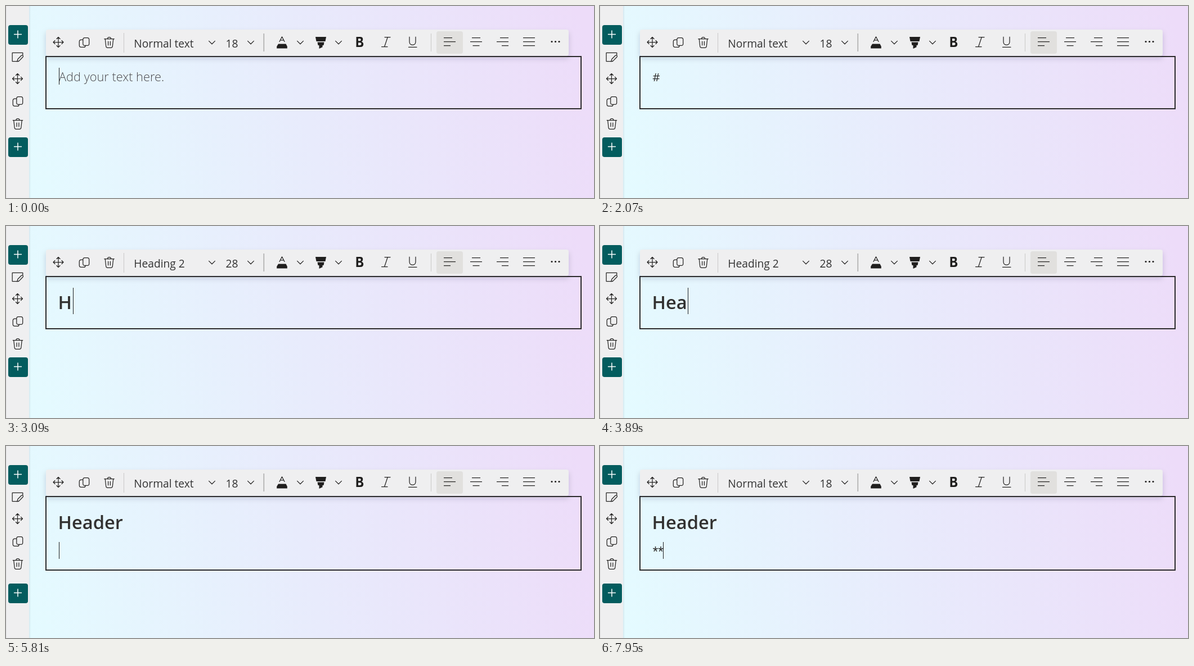
These frames come from a looping animation (1045x342 px, 8000 ms). An HTML page:

```html
<!DOCTYPE html>
<html lang="en">
<head>
<meta charset="utf-8">
<title>Text editor</title>
<style>
  html, body { margin: 0; width: 100%; height: 100%; overflow: hidden; }
  svg { display: block; width: 100vw; height: 100vh; }
  text { font-family: "Open Sans", "Noto Sans", sans-serif; fill: #323130; white-space: pre; }
  .label { font-size: 19.2px; fill: #333; }
  .hint { font-size: 21.8px; font-weight: 300; fill: #4c4b4e; }
  .body { font-size: 20.8px; }
  .head { font-size: 32.6px; font-weight: 600; }
  .head.hint { fill: #605e5c; }
  .stars { font-family: Roboto, "Open Sans", sans-serif; font-size: 22px; }
  .icon { fill: none; stroke: #252423; stroke-width: 1.25; stroke-linecap: round; stroke-linejoin: round; }
  .solid { fill: #201f1e; }
</style>
</head>
<body>
<svg viewBox="0 0 1045 342" preserveAspectRatio="none">
  <defs>
    <linearGradient id="sky" gradientUnits="userSpaceOnUse" x1="41" y1="342" x2="1045" y2="120">
      <stop offset="0" stop-color="#e4fbff"/>
      <stop offset=".5" stop-color="#e8ebfc"/>
      <stop offset="1" stop-color="#eddcf9"/>
    </linearGradient>
    <filter id="shade" x="-5%" y="-40%" width="110%" height="220%">
      <feDropShadow dx="0" dy="5" stdDeviation="5" flood-color="#1c2440" flood-opacity=".17"/>
    </filter>
    <filter id="edge" x="-20%" y="-5%" width="150%" height="110%">
      <feDropShadow dx="1" dy="0" stdDeviation="1.5" flood-color="#1c2440" flood-opacity=".1"/>
    </filter>
    <path id="move" d="M0-9V9M-9 0H9M-3-6 0-9 3-6M-3 6 0 9 3 6M-6-3-9 0-6 3M6-3 9 0 6 3"/>
    <path id="copy" d="M1-8.5H5.5Q8.7-8.5 8.7-5.3V2.2Q8.7 5.4 5.5 5.4H1Q-2.2 5.4-2.2 2.2V-5.3Q-2.2-8.5 1-8.5ZM-2.2-4.8H-5Q-8.7-4.8-8.7-1.4V5Q-8.7 8.4-5.3 8.4H-.8Q2.2 8.4 2.2 5.4"/>
    <path id="bin" d="M-8.7-6.3H8.7M-3.2-6.5Q-3-9.5 0-9.5T3.2-6.5M-7.2-6-5.8 6.8Q-5.5 9.4-3 9.4H3Q5.5 9.4 5.8 6.8L7.2-6M-1.9-2V4.8M1.9-2V4.8"/>
    <path id="edit" d="M2 7.5H-9.3V-7.7H9.3V-4M-.8 8 .4 3.8 7-3Q8.4-4 9.5-2.8T9.6-.3L3 6.6Z"/>
    <path id="chevron" d="M-5.4-2.6 0 2.8 5.4-2.6"/>
    <g id="plus">
      <rect x="-17.5" y="-17.5" width="35" height="35" rx="4" fill="#035c5e"/>
      <path d="M-7.5-1H6.5M-.5-8V6" stroke="#fff" stroke-width="1.5"/>
    </g>
  </defs>

  <rect width="1045" height="342" fill="url(#sky)"/>
  <rect id="box" x="71" y="90" width="951" fill="none" stroke="#2c2b2c" stroke-width="2"/>

  <rect x="-4" y="-10" width="45" height="362" fill="#efeff0" filter="url(#edge)"/>
  <path d="M.5 0V342" stroke="#e2e2e3"/>
  <use href="#plus" x="21.5" y="51.5"/>
  <use id="lowerPlus" href="#plus" x="21.5"/>

  <rect x="71" y="42" width="929" height="46.5" rx="4" fill="#efeff0" filter="url(#shade)"/>
  <rect x="765" y="45" width="47" height="40" rx="4" fill="#e1e0de"/>
  <path d="M209.5 48V83M755.5 49V81" stroke="#c9c8c8"/>
  <path d="M458.3 49V81" stroke="#adacac" stroke-width="1.6"/>

  <g id="icons" class="icon"></g>

  <g class="icon">
    <path d="M486 63.5 490.5 54.8 495 63.5M487.6 60.8H493.4"/>
    <path d="M683 55.5H673M678 72.5H667.5M678.3 55.5 672.6 72.5"/>
    <path d="M717 55V63.5Q717 69.3 722.5 69.3T728 63.5V55M715.5 73.3H730"/>
    <path id="align" stroke-linecap="butt"/>
  </g>
  <g class="solid">
    <path d="M484 67.5H497.5L499.8 72V75.5H481.2V72Z"/>
    <path d="M550 55H569L567.5 63H551.5ZM553.5 64.5H565.5L564.5 70H562.5V73.2L556.5 76V70H554.5Z"/>
    <path fill-rule="evenodd" d="M622.5 55H629.5Q634.3 55 634.3 59.4 634.3 62.3 631.8 63.4 635.2 64.5 635.2 68 635.2 73 629.8 73H622.5ZM626 58V62.2H628.6Q630.8 62.2 630.8 60T628.6 58ZM626 65.2V70H629.1Q631.6 70 631.6 67.6T629.1 65.2Z"/>
    <circle cx="970" cy="63.5" r="1.6"/>
    <circle cx="976.5" cy="63.5" r="1.6"/>
    <circle cx="983" cy="63.5" r="1.6"/>
  </g>

  <text id="style" class="label" x="227.3" y="74"/>
  <text id="size" class="label" x="390.5" y="74"/>
  <text id="line1"/>
  <text id="line2" class="stars" x="93.7" y="195"/>
  <rect id="caret" width="1" fill="#1f1f1f"/>
</svg>
<script>
const LOOP = 8000, HEADING = 2270, ENTER = 5410;
const HINT = 'Add your text here.';
const $ = id => document.getElementById(id);

// time, text on the current line, caret x, blink half-period
const steps = [
  [-60, '', 94, 200],
  [1470, '#', 107, 200],
  [HEADING, '', 94, 207],
  [3090, 'H', 119, 200],
  [3420, 'He', 138, 200],
  [3700, 'Hea', 156, 200],
  [3980, 'Head', 177, 200],
  [4260, 'Heade', 196, 200],
  [4550, 'Header', 209, 260],
  [4940, 'Header', 209, 270],
  [ENTER, '', 94, 200],
  [6210, '', 94, 135],
  [6480, '*', 103, 200],
  [7550, '**', 112, 200]
];

const icons = [
  ['edit', 20.5, 91], ['move', 20.5, 129.5], ['copy', 21, 170], ['bin', 21, 210],
  ['move', 93, 64.5], ['copy', 139, 65], ['bin', 183.5, 65],
  ...[366, 435, 523, 591].map(x => ['chevron', x, 65])
];
$('icons').innerHTML = icons.map(([id, x, y]) => `<use href="#${id}" x="${x}" y="${y}"/>`).join('');

// left edge, indent factor, lengths of the short rows
$('align').setAttribute('d', [[778, 0, 15, 12], [825, .5, 15, 12], [872, 1, 15, 12], [919, 0, 21, 21]]
  .map(([x, k, top, low]) => [top, 21, low]
    .map((w, i) => `M${x + k * (21 - w)} ${56.5 + 7 * i}h${w}`).join('')).join(''));

function set(id, attrs) {
  for (const key in attrs) $(id).setAttribute(key, attrs[key]);
}

function write(id, text) {
  if ($(id).textContent !== text) $(id).textContent = text;
}

function draw(t) {
  const [start, text, x, half] = steps.findLast(s => s[0] <= t);
  const heading = t >= HEADING, second = t >= ENTER;
  const onHeading = heading && !second;
  const first = second ? 'Header' : text;

  write('style', onHeading ? 'Heading 2' : 'Normal text');
  write('size', onHeading ? '28' : '18');
  write('line1', first || HINT);
  set('line1', {
    class: heading ? (first ? 'head' : 'head hint') : (first ? 'body' : 'hint'),
    x: heading ? (first ? 92.5 : 94) : (first ? 93.3 : 94),
    y: heading ? 148 : 134
  });
  write('line2', second ? text : '');

  set('box', { height: second ? 131 : 93 });
  set('lowerPlus', { y: second ? 262.5 : 251.5 });
  set('caret', {
    x,
    y: second ? 171 : 110,
    height: onHeading ? 47 : 30,
    visibility: Math.floor((t - start) / half) % 2 ? 'hidden' : 'visible'
  });
}

const begin = performance.now();
function tick() {
  draw((performance.now() - begin) % LOOP);
  requestAnimationFrame(tick);
}
tick();
</script>
</body>
</html>
```
